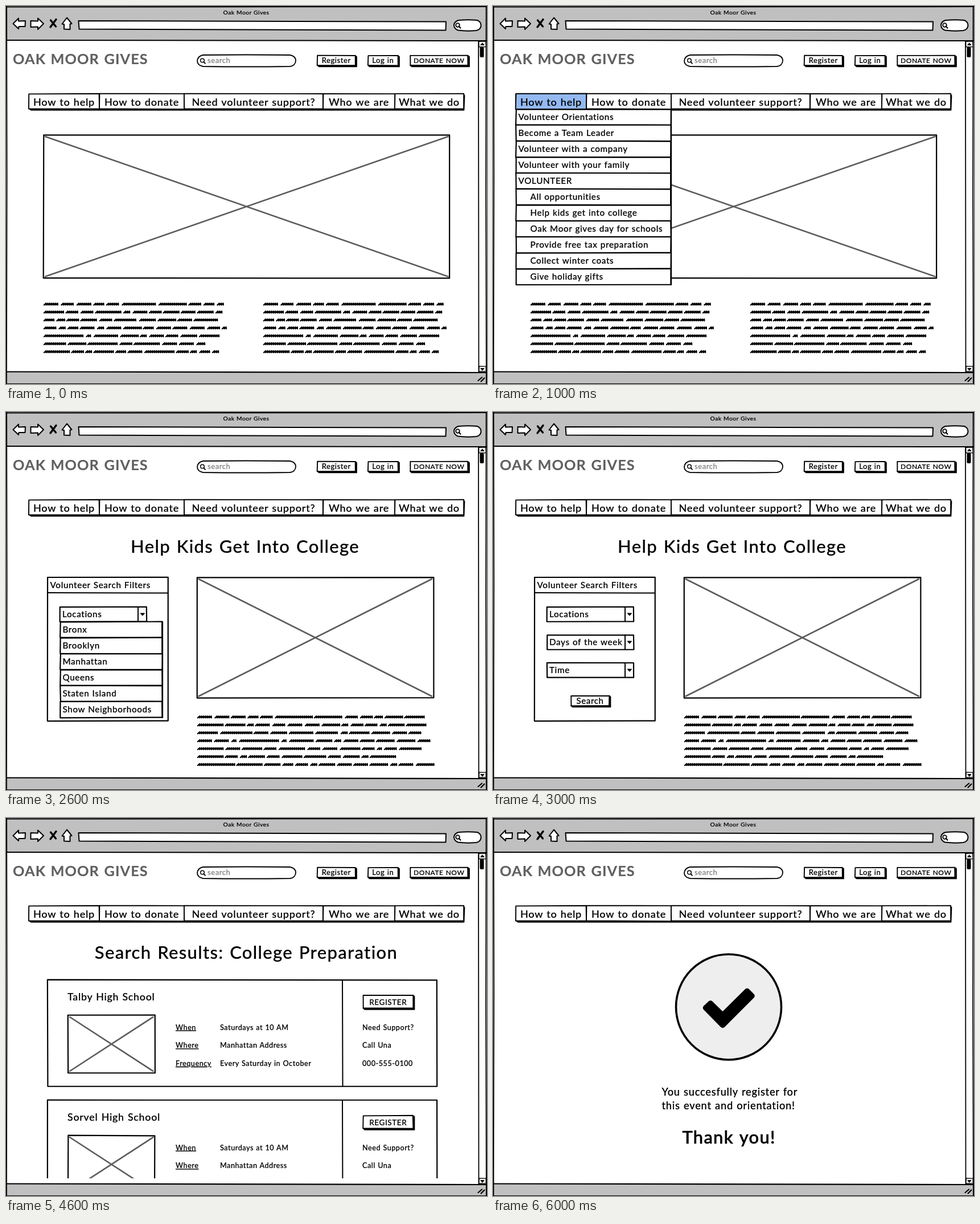
These frames come from a looping animation (845x663 px, 7 s). An HTML page:

```html
<!DOCTYPE html>
<html lang="en">
<head>
<meta charset="utf-8">
<title>Volunteer site wireframe</title>
<style>
html, body { margin: 0; width: 100%; height: 100%; overflow: hidden; background: #fff; }
svg { display: block; width: 845px; height: 663px; }
text {
  font-family: Lato, "Open Sans", sans-serif; font-weight: 500;
  letter-spacing: .043em; word-spacing: .05em;
  color: #000; fill: currentColor; stroke: currentColor; stroke-width: .2;
}
</style>
</head>
<body>
<svg id="stage" viewBox="0 0 845 663"></svg>
<script>
const NS = 'http://www.w3.org/2000/svg';
const stage = document.getElementById('stage');
const STEP = 1000;
let layer = stage;

let seed = 7;
const rand = () => (seed = (seed * 16807) % 2147483647) / 2147483647;
const wob = () => (rand() - .5) * .9;

function add(tag, attrs, parent = layer) {
  const el = document.createElementNS(NS, tag);
  for (const k in attrs) el.setAttribute(k, attrs[k]);
  parent.appendChild(el);
  return el;
}

function group(draw, attrs = {}) {
  const outer = layer;
  const g = layer = add('g', attrs);
  draw();
  layer = outer;
  return g;
}

const path = (d, width = 2, stroke = '#000', fill = 'none') => add('path', {
  d, stroke, fill, 'stroke-width': width, 'stroke-linecap': 'round', 'stroke-linejoin': 'round'
});

const line = (x1, y1, x2, y2, width, stroke) => path(`M${x1} ${y1}L${x2} ${y2}`, width, stroke);

const text = (s, x, y, size, attrs = {}) => {
  add('text', { x, y, 'font-size': size, ...attrs }).textContent = s;
};
const centred = (s, x, y, size) => text(s, x, y, size, { 'text-anchor': 'middle' });

// Hand-drawn rectangle with slightly uneven corners
function box(x1, y1, x2, y2, fill = '#fff', width = 2.2) {
  const corners = [[x1, y1], [x2, y1], [x2, y2], [x1, y2]]
    .map(([x, y]) => `${(x + wob()).toFixed(2)} ${(y + wob()).toFixed(2)}`);
  path(`M${corners.join('L')}Z`, width, '#000', fill);
}

function button(label, x1, y1, x2, y2, base, size) {
  path(`M${x1} ${y2}L${x1 + 3} ${y2 + 2.5}H${x2 + 2.5}V${y1 + 2}L${x2} ${y1}V${y2}Z`, 1.7, '#000', '#000');
  box(x1, y1, x2, y2, '#fff', 1.9);
  centred(label, (x1 + x2) / 2, base, size);
}

function picture(x1, y1, x2, y2) {
  box(x1, y1, x2, y2);
  line(x1 + 3, y1 + 3, x2 - 3, y2 - 3, 2.6, '#5c5c5c');
  line(x1 + 3, y2 - 3, x2 - 3, y1 + 3, 2.6, '#5c5c5c');
}

function lens(x, y, r, width) {
  add('circle', { cx: x, cy: y, r, fill: '#fff', stroke: '#000', 'stroke-width': width });
  line(x + r * .7, y + r * .7, x + r * 1.5, y + r * 1.6, width + .3);
}

// Scribbled filler text: each row lists its word widths
function scribble(x, y, rows) {
  rows.forEach((row, i) => {
    let left = x, d = '';
    for (const w of row) {
      d += `M${left + 1} ${y + i * 13.9 + 1.4}` + 'l3.2 -3l.2 3'.repeat(Math.max(2, Math.round((w - 1) / 3.4)));
      left += w + 4.5;
    }
    path(d, 2.3);
  });
}

function list(items, x1, x2, y) {
  items.forEach((item, i) => {
    const top = y + i * 28;
    box(x1, top, x2, top + 28);
    const sub = item[0] === '>';
    text(sub ? item.slice(1) : item, x1 + (sub ? 25 : 4), top + 19, 15.2);
  });
  line(x2 + .5, y, x2 + .5, y + items.length * 28, 2.2);
}

function dropdown(label, y) {
  box(95, y, 247, y + 25.5);
  line(232, y, 232, y + 25, 2);
  path(`M236.5 ${y + 11}H243.5L240 ${y + 15}Z`, 1, '#000', '#000');
  text(label, 99, y + 17.5, 15.2);
}

function browser() {
  add('rect', { width: 845, height: 663, fill: '#fff' });
  add('rect', { width: 845, height: 60, fill: '#c0c0c0' });
  add('rect', { y: 642, width: 845, height: 21, fill: '#c0c0c0' });
  path('M0 1.5L845 1', 2.2);
  path('M0 60L420 60.5L845 61', 2);
  path('M0 641.5L845 643', 2.2);
  path('M1 0L1.5 300L.8 663', 2);
  path('M843.7 0L843.2 330L844 663', 2);
  path('M0 662.5H845', 1.2);
  centred('Oak Moor Gives', 422, 15, 10.3);

  path('M12.5 31L22 21.5V26.5L34 26L33.5 36H22.5L22 40Z', 2, '#000', '#fff');
  path('M66 31L56 21.5V26.5L43.5 26V37L56 36.5V41Z', 2, '#000', '#fff');
  path('M78.5 25L87.5 36M88 23.5L78 37', 3.4);
  path('M107 20.5L115.5 31L112.5 31.5V41L102 40.5V32L98.5 31.5Z', 2, '#000', '#fff');
  path('M127.5 26L773 27.5L772.5 42.5L128.5 40.5Z', 2, '#000', '#fff');
  path('M795 25Q812 23.5 828 25Q835 28 834.5 35Q833 42 826 43Q808 44.5 794 42.5Q787 40 787 33Q788 27 795 25Z', 2, '#000', '#fff');
  lens(793.5, 33.5, 3.3, 1.8);

  line(830, 61, 830.5, 642, 1.8);
  box(831, 62, 843, 71.5, '#fff', 1.4);
  box(831, 632, 843, 641, '#fff', 1.4);
  path('M834 68.5H840L837 65Z', 1, '#000', '#000');
  path('M834 635.5H840L837 639Z', 1, '#000', '#000');
  add('rect', { x: 832.5, y: 72, width: 7, height: 18, rx: 2 });
  path('M829.5 657L836 651.5M834.5 658.5L840.5 652.5', 2.2);
}

const tabs = [['How to help', 40, 164], ['How to donate', 164, 313], ['Need volunteer support?', 313, 557],
  ['Who we are', 557, 683], ['What we do', 683, 804]];

function tab([label, x1, x2], fill) {
  box(x1, 154, x2, 180.5, fill, 1.9);
  centred(label, (x1 + x2) / 2, 174.5, 18.1);
}

function header() {
  text('OAK MOOR GIVES', 12, 101.5, 25.3, { style: 'font-weight:700;color:#606060' });
  path('M346 86Q420 85 499 86Q509 88 509 96Q508 105 499 106Q420 107 346 106Q336 104 336 96Q337 88 346 86Z', 1.8, '#000', '#fff');
  lens(345, 95.5, 3.3, 1.5);
  text('search', 354, 100, 13, { style: 'color:#808080' });
  button('Register', 547, 87, 613.5, 104, 100, 13);
  button('Log in', 636, 87, 688.5, 104, 100, 13);
  button('DONATE NOW', 710, 87, 811.5, 104, 100, 12);

  path('M40 180L44 182.5L804.5 182.5L805.5 157L803 154V180Z', 1.8, '#000', '#000');
  tabs.forEach(t => tab(t, '#fff'));
}

const title = (s, x) => centred(s, x, 247, 31);

const homeText = [
  [26, 23, 25, 18, 23, 60, 48, 22, 19, 12],
  [34, 22, 21, 45, 12, 24, 20, 27, 24, 28, 12],
  [18, 13, 20, 29, 21, 40, 28, 30, 24, 42],
  [22, 11, 17, 26, 12, 25, 30, 19, 24, 26, 26, 21, 9],
  [70, 9, 42, 30, 12, 24, 22, 28, 34],
  [38, 30, 52, 20, 46, 25, 26, 13],
  [44, 20, 10, 34, 17, 25, 51, 20, 12, 18, 11]
];
const pageText = [
  [26, 24, 25, 17, 22, 64, 50, 22, 20, 14, 30, 34],
  [44, 34, 10, 26, 22, 26, 25, 30, 12, 20, 22, 10, 27, 34],
  [36, 54, 25, 28, 42, 40, 10, 35, 32, 24, 22],
  [25, 26, 9, 70, 9, 42, 28, 12, 24, 24, 32, 32, 22],
  [45, 24, 34, 22, 46, 22, 26, 34, 22, 8, 22, 37],
  [44, 22, 10, 28, 22, 34, 38, 22, 28, 10, 44],
  [64, 44, 28, 18, 22, 10, 28, 24, 24, 32, 10, 26, 31]
];

function home() {
  picture(66, 226, 779.5, 477.5);
  scribble(66, 523, homeText);
  scribble(452, 523, homeText);
}

function helpMenu() {
  tab(tabs[0], '#94b9f1');
  list(['Volunteer Orientations', 'Become a Team Leader', 'Volunteer with a company',
    'Volunteer with your family', 'VOLUNTEER', '>All opportunities', '>Help kids get into college',
    '>Oak Moor gives day for schools', '>Provide free tax preparation', '>Collect winter coats',
    '>Give holiday gifts'], 40.5, 312.5, 181);
}

function college() {
  title('Help Kids Get Into College', 420);
  box(73, 290, 284.5, 542);
  line(73, 317, 284, 317.5, 2);
  text('Volunteer Search Filters', 77.5, 308.5, 15.2);
  dropdown('Locations', 342);
  picture(335.5, 290, 751, 501.5);
  scribble(336, 535, pageText);
}

function places() {
  list(['Bronx', 'Brooklyn', 'Manhattan', 'Queens', 'Staten Island', 'Show Neighborhoods'], 95.5, 274.5, 368);
}

function filters() {
  dropdown('Days of the week', 391);
  dropdown('Time', 440);
  button('Search', 137, 497.5, 204, 515, 511.5, 15);
}

function card(school, y) {
  box(73, y, 757, y + 186.5);
  line(591, y, 591.5, y + 186, 2);
  text(school, 108, y + 36, 17.8);
  picture(109, y + 62, 261.5, y + 163);
  const facts = [['When', 'Saturdays at 10 AM', 'Need Support?'], ['Where', 'Manhattan Address', 'Call Una'],
    ['Frequency', 'Every Saturday in October', '000-555-0100']];
  facts.forEach(([label, value, help], i) => {
    const base = y + 87.5 + i * 31.7;
    text(label, 298, base, 12.6, { 'text-decoration': 'underline' });
    text(value, 376, base, 12.6);
    text(help, 626, base, 12.6);
  });
  button('REGISTER', 627.5, y + 27, 715, y + 49.5, y + 44, 13.5);
}

function results() {
  title('Search Results: College Preparation', 422);
  const clip = add('clipPath', { id: 'page' });
  add('rect', { y: 270, width: 830, height: 362 }, clip);
  group(() => {
    card('Talby High School', 284);
    card('Sorvel High School', 495);
  }, { 'clip-path': 'url(#page)' });
}

function signup() {
  title('College Preparation at Talby High School', 428);
  ['Before you can register from this volunteer opportunity, we would like you to',
    'attend a volunteer orientation to learn how to succeed in this role and make',
    'the greatest impact.'].forEach((s, i) => text(s, 71.5, 304 + i * 24, 18.2));

  box(56, 389, 371.5, 581);
  line(56, 416, 371, 416, 2);
  text('Form', 60, 408, 15.2);
  [['Name:', 478], ['Email:', 534]].forEach(([s, y]) => {
    text(s, 83, y, 15.5);
    path(`M153 ${y + 4}Q240 ${y + 5.5} 333 ${y + 5}`, 1.6);
  });

  box(455, 387, 771, 415.5);
  text('Orientations', 461, 405.5, 15.2);
  ['November 5th at 10 AM', 'November 12th at 1 PM', 'November 20th at 2 PM'].forEach((s, i) => {
    const y = 433 + i * 48.3;
    box(455, y, 771, y + 28);
    text(s, 460.5, y + 18.5, 15);
    button('Select', 704.5, y + 4, 758.5, y + 21.5, y + 18, 13);
  });
  text('More options +', 772.5, 581, 12.5, { 'text-anchor': 'end' });
  button('Submit', 702, 599, 770, 616.5, 614, 15.2);
}

function thanks() {
  add('circle', { cx: 414, cy: 331.5, r: 92.5, fill: '#eee', stroke: '#000', 'stroke-width': 3.6 });
  path('M373.5 333L382 325L403.5 346L446.5 303.5L455 312L403.5 363.5Z', 9.5, '#000', '#000');
  text('You succesfully register for', 296.5, 487, 18.2);
  text('this event and orientation!', 296.5, 511, 18.2);
  text('Thank you!', 332.5, 571, 30.8, { style: 'stroke-width:.6' });
}

browser();
header();

// Each part is visible during the listed steps
const parts = [
  [home, [0, 1]], [helpMenu, [1]], [college, [2, 3]], [places, [2]],
  [filters, [3]], [results, [4]], [signup, [5]], [thanks, [6]]
].map(([draw, steps]) => ({ el: group(draw), steps }));

function render(t) {
  const now = Math.floor(t / STEP) % 7;
  for (const { el, steps } of parts) el.style.display = steps.includes(now) ? '' : 'none';
}

const start = performance.now();
function tick() {
  render(performance.now() - start);
  requestAnimationFrame(tick);
}
tick();
</script>
</body>
</html>
```
